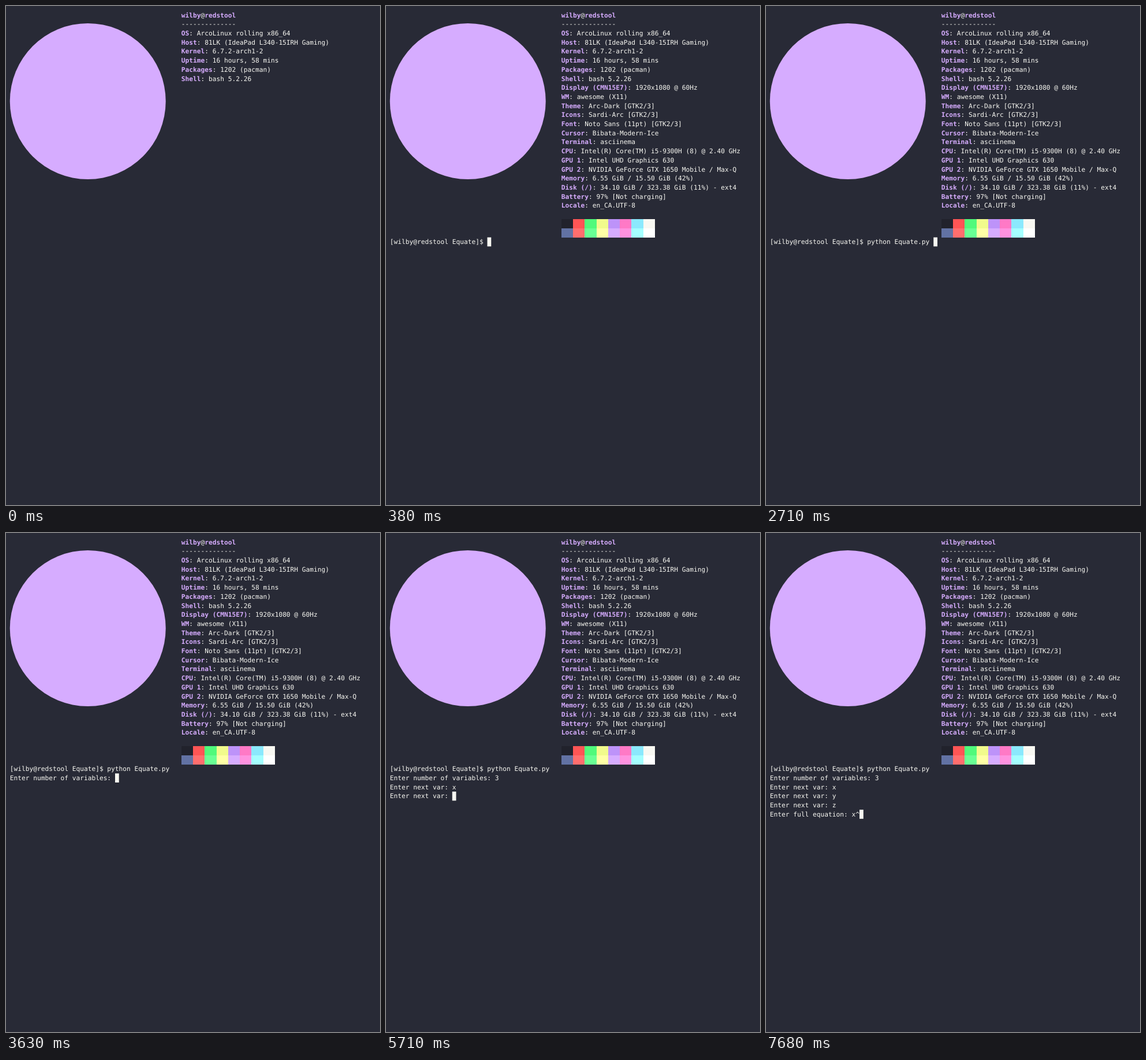
Animation of 648 by 864 pixels, one loop 8000 ms. Source, as an HTML page:

```html
<!DOCTYPE html>
<html lang="en">
<head>
<meta charset="utf-8">
<title>Terminal session</title>
<style>
  html, body { margin: 0; width: 100%; height: 100%; overflow: hidden; background: #282a36; }
  svg { display: block; width: 648px; height: 864px; }
  text {
    font: 11.212px "DejaVu Sans Mono", monospace;
    fill: #f8f8f2;
    white-space: pre;
    text-rendering: geometricPrecision;
  }
  .key { font-weight: bold; fill: #d6acff; }
  .logo { fill: #d6acff; }
  .cursor { fill: #f8f8f2; }
  #first { animation: first 8s step-end infinite; }
  #rest { animation: rest 8s step-end infinite; }
  @keyframes first { 0% { visibility: hidden } 1.375%, 100% { visibility: visible } }
  @keyframes rest { 0% { visibility: hidden } 2.875%, 100% { visibility: visible } }
</style>
</head>
<body>
<svg viewBox="0 0 648 864">
  <circle class="logo" cx="141.75" cy="165" r="135"/>
  <g id="ready"></g>
  <g id="first"></g>
  <g id="rest"></g>
  <g id="shell"></g>
</svg>
<script>
const CELL = 6.75, ROW = 864 / 55, LOOP = 8000;
const INFO_COL = 44, SHELL_ROW = 25;
const colX = c => (c + 1) * CELL;
const rowY = r => (r + 0.5) * ROW;
const byId = id => document.getElementById(id);

function add(parent, tag, attrs, content = '') {
  const el = document.createElementNS('http://www.w3.org/2000/svg', tag);
  for (const k in attrs) el.setAttribute(k, attrs[k]);
  el.textContent = content;
  parent.appendChild(el);
  return el;
}

const addLine = (parent, col, row, content) =>
  add(parent, 'text', { x: colX(col), y: rowY(row) + 11.7 }, content);

function addInfo(parent, row, entry) {
  const cut = entry.indexOf(': ');
  const line = addLine(parent, INFO_COL, row);
  add(line, 'tspan', { class: 'key' }, entry.slice(0, cut));
  add(line, 'tspan', {}, entry.slice(cut));
}

// System summary
const info = [
  'OS: ArcoLinux rolling x86_64',
  'Host: 81LK (IdeaPad L340-15IRH Gaming)',
  'Kernel: 6.7.2-arch1-2',
  'Uptime: 16 hours, 58 mins',
  'Packages: 1202 (pacman)',
  'Shell: bash 5.2.26',
  'Display (CMN15E7): 1920x1080 @ 60Hz',
  'WM: awesome (X11)',
  'Theme: Arc-Dark [GTK2/3]',
  'Icons: Sardi-Arc [GTK2/3]',
  'Font: Noto Sans (11pt) [GTK2/3]',
  'Cursor: Bibata-Modern-Ice',
  'Terminal: asciinema',
  'CPU: Intel(R) Core(TM) i5-9300H (8) @ 2.40 GHz',
  'GPU 1: Intel UHD Graphics 630',
  'GPU 2: NVIDIA GeForce GTX 1650 Mobile / Max-Q',
  'Memory: 6.55 GiB / 15.50 GiB (42%)',
  'Disk (/): 34.10 GiB / 323.38 GiB (11%) - ext4',
  'Battery: 97% [Not charging]',
  'Locale: en_CA.UTF-8'
];
const title = addLine(byId('ready'), INFO_COL, 0);
add(title, 'tspan', { class: 'key' }, 'wilby');
add(title, 'tspan', {}, '@');
add(title, 'tspan', { class: 'key' }, 'redstool');
addLine(byId('ready'), INFO_COL, 1, '-'.repeat(14));
info.forEach((entry, i) =>
  addInfo(byId(i < 6 ? 'ready' : i < 14 ? 'first' : 'rest'), i + 2, entry));

const palette = [
  '#21222c #ff5555 #50fa7b #f1fa8c #bd93f9 #ff79c6 #8be9fd #f8f8f2',
  '#6272a4 #ff6e6e #69ff94 #ffffa5 #d6acff #ff92df #a4ffff #ffffff'
];
palette.forEach((colors, r) => colors.split(' ').forEach((fill, i) =>
  add(byId('rest'), 'rect', {
    x: colX(INFO_COL + 3 * i), y: rowY(23 + r), width: 3 * CELL, height: ROW,
    fill, 'shape-rendering': 'crispEdges'
  })));

// Shell session: each step appends output at its time (ms)
const steps = [
  [230, ''], [380, '[wilby@redstool Equate]$ '],
  [1650, 'p'], [1700, 'y'], [1820, 't'], [1930, 'h'], [2040, 'o'], [2150, 'n'], [2270, ' '],
  [2610, 'E'], [2710, 'quate.py '], [3380, '\n'],
  [3630, 'Enter number of variables: '], [4920, '3'],
  [5110, '\nEnter next var: '], [5540, 'x'],
  [5710, '\nEnter next var: '], [5820, 'y'],
  [5970, '\nEnter next var: '], [6080, 'z'],
  [6220, '\nEnter full equation: '], [7150, 'x'], [7680, '^']
];
const shell = byId('shell');
const lines = Array.from({ length: 6 }, (_, i) => addLine(shell, 0, SHELL_ROW + i));
const cursor = add(shell, 'rect', { class: 'cursor', width: CELL, height: ROW });
let shown = -1;

function draw(t) {
  const count = steps.filter(s => s[0] <= t).length;
  if (count === shown) return;
  shown = count;
  const rows = steps.slice(0, count).map(s => s[1]).join('').split('\n');
  lines.forEach((line, i) => { line.textContent = rows[i] || ''; });
  const last = rows.length - 1;
  cursor.setAttribute('x', colX(rows[last].length));
  cursor.setAttribute('y', rowY(SHELL_ROW + last));
  cursor.setAttribute('visibility', count ? 'visible' : 'hidden');
}

const clock = () => {
  const start = document.timeline.currentTime || 0;
  const tick = () => {
    draw((performance.now() - start) % LOOP);
    requestAnimationFrame(tick);
  };
  tick();
};
draw(0);
clock();
</script>
</body>
</html>
```
